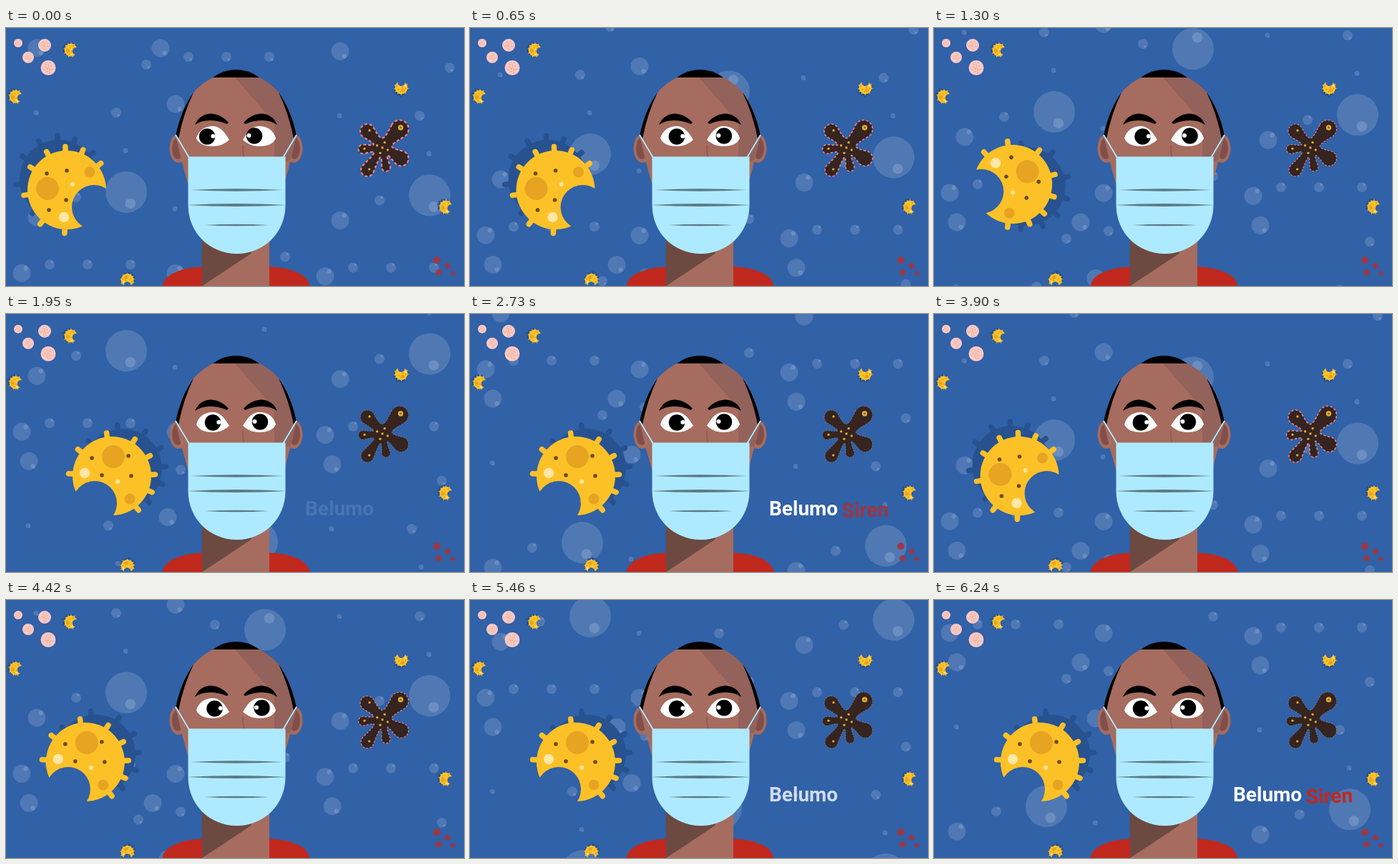
These frames come from a looping animation (640 by 360 pixels, 6.5 s). An HTML page with a canvas:

```html
<!DOCTYPE html>
<html lang="en">
<head>
<meta charset="utf-8">
<style>
  html, body { margin: 0; width: 100%; height: 100%; overflow: hidden; background: #3161a7; }
  canvas { display: block; width: 640px; height: 360px; }
</style>
</head>
<body>
<canvas id="stage" width="640" height="360"></canvas>
<script>
const ctx = document.getElementById('stage').getContext('2d');
const TICK = 130, SLOTS = 50, PASS = 25, TRAVEL = 1950;
const SKIN = '#a56c5f', SKIN_DARK = '#93625a', MASK = '#aeeaff', BLACK = '#000';
const YELLOW = '#fdc128', ORANGE = '#e6a422', CREAM = '#ffe7a5', BROWN = '#6b4c14';
const TAU = 2 * Math.PI, FACE_X = 321.5;
const rad = deg => deg * TAU / 360;
const ramp = (t, from, to) => Math.min(1, Math.max(0, (t - from) / (to - from)));
// Quick at both ends, slow in the middle.
const surge = p => p + 0.12 * Math.sin(TAU * p);

function disc(x, y, r, color, ry = r) {
  ctx.fillStyle = color;
  ctx.beginPath();
  ctx.ellipse(x, y, r, ry, 0, 0, TAU);
  ctx.fill();
}

function shape(d, color) {
  ctx.fillStyle = color;
  ctx.fill(new Path2D(d));
}

function line(d, color, width) {
  ctx.strokeStyle = color;
  ctx.lineWidth = width;
  ctx.stroke(new Path2D(d));
}

// Draws the left half of the face, then its mirror image.
function bothSides(draw) {
  draw();
  ctx.save();
  ctx.translate(2 * FACE_X, 0);
  ctx.scale(-1, 1);
  draw();
  ctx.restore();
}

// One group of bubbles by radius; the whole field repeats it.
const bubbleGroup = [
  [12.5, [43, 28], [43, 264], [22, 342]],
  [7, [196, 51], [154, 118], [98, 236], [61, 330], [114, 330], [174, 330]],
  [3.5, [42, 118], [167, 171]],
  [29, [168, 229]]
];

function bubble(x, y, r, shineX, shineY) {
  disc(x, y, r, 'rgba(255,255,255,.15)');
  disc(x + r * shineX, y + r * shineY, r * 0.25, 'rgba(255,255,255,.16)');
}

function bubbles(scroll) {
  for (let row = 0; row < 2; row++) {
    for (let col = 0; col < 3; col++) {
      const flip = col === 1;
      const dx = 194 * col + 36 * (col >> 1) - 11 * row;
      const dy = 355 * row + 2.2 * col - scroll;
      for (const [r, ...spots] of bubbleGroup) {
        for (const [x, y] of spots) {
          const side = (r > 20 || y < 180) !== flip ? 1 : -1;
          bubble(x + dx, (flip ? 368 - y : y) + dy, r, r > 20 ? 0.2 : 0.45, 0.55 * side);
        }
      }
    }
  }
}

function virusBody(color) {
  ctx.strokeStyle = color;
  ctx.lineWidth = 7.5;
  ctx.lineCap = 'round';
  ctx.beginPath();
  for (const deg of [-177, -142, -97, -58, -28, -2, 22, 52]) {
    const c = Math.cos(rad(deg)), s = Math.sin(rad(deg));
    ctx.moveTo(c * 48, s * 48);
    ctx.lineTo(c * 60.5, s * 60.5);
  }
  ctx.stroke();
  // Disc with a round bite taken out of its edge.
  const bx = -24, by = 38, R = 55, r = 31, d = Math.hypot(bx, by), dir = Math.atan2(by, bx);
  const outer = Math.acos((d * d + R * R - r * r) / (2 * d * R));
  const inner = Math.acos((d * d + r * r - R * R) / (2 * d * r));
  ctx.fillStyle = color;
  ctx.beginPath();
  ctx.arc(0, 0, R, dir + outer, dir - outer + TAU);
  ctx.arc(bx, by, r, dir + Math.PI + inner, dir + Math.PI - inner, true);
  ctx.fill();
}

function virus(x, y, deg, scale = 1) {
  ctx.save();
  ctx.translate(x, y);
  ctx.rotate(rad(deg));
  ctx.scale(scale, scale);
  ctx.translate(-8, 8);
  ctx.save();
  ctx.translate(15, -11);
  virusBody('#27528f');
  ctx.restore();
  virusBody(YELLOW);
  disc(2, -27, 16, ORANGE);
  disc(25, 32, 7.5, ORANGE);
  disc(-38, -4, 7.2, CREAM);
  disc(8, 8, 2.9, CREAM);
  for (const side of [-1, 1]) {
    disc(-2.5 + 25.5 * side, -26.5 - 1.5 * side, 2.8, BROWN);
    disc(6.5 + 20.5 * side, -0.5 + 0.5 * side, 2.8, BROWN);
  }
  ctx.restore();
}

function amoeba(rim) {
  const cx = 526, cy = 167, spread = 1.85, core = 8;
  const arms = [[550, 141, 12.5], [552, 182, 10.5], [531, 194, 6], [505, 198, 9], [499, 169, 6.5], [505, 144, 10]]
    .map(([x, y, r]) => ({ x, y, r, a: Math.atan2(y - cy, x - cx) }));
  const around = (x, y, r, a) => [x + r * Math.cos(a), y + r * Math.sin(a)];
  const path = new Path2D();
  arms.forEach(({ x, y, r, a }, i) => {
    const next = arms[(i + 1) % arms.length];
    const gap = (next.a - a + TAU) % TAU;
    path.arc(x, y, r, a - spread, a + spread);
    path.bezierCurveTo(
      ...around(cx, cy, core, a + gap * 0.4),
      ...around(cx, cy, core, a + gap * 0.6),
      ...around(next.x, next.y, next.r, next.a - spread));
  });
  ctx.fillStyle = '#35241f';
  ctx.fill(path);
  ctx.save();
  ctx.lineCap = 'butt';
  ctx.setLineDash([1 + rim * 1.3, 1.6 + rim * 0.6]);
  ctx.strokeStyle = rim < 0.8 ? '#b89a98' : '#ee8084';
  ctx.lineWidth = rim;
  ctx.stroke(path);
  ctx.restore();

  for (let i = 0; i < 5; i++) disc(...around(cx, cy, i && 8, i * TAU / 4 + 0.4), 1.7, '#dfab32');
  for (const { x, y, r } of arms.slice(3)) disc(x + r * 0.3, y - r * 0.1, 1.7, '#dfab32');
  disc(551.5, 139, 3.7, '#e3b033');
  disc(551.5, 139, 1.2, BROWN);
}

function smallCells() {
  for (const [x, y, r] of [[17, 21, 6], [54, 24, 9], [31, 41, 8], [59, 55.5, 10.5]]) {
    disc(x, y, r, '#f8c8c8');
    for (let i = 0; i < 12; i++) {
      const q = r * 0.2 * Math.sqrt(i), a = i * 2.4;
      disc(x + q * Math.cos(a), y + q * Math.sin(a), r * 0.1, '#efb27c');
    }
  }
  for (const [x, y, r] of [[602, 324, 5], [617, 331.5, 3.8], [604.5, 341, 4.3], [624.5, 342, 3]])
    disc(x, y, r, '#9c3947');
  for (const [x, y, deg] of [[89, 30, -110], [12, 95, -110], [613, 249, -110], [552, 85, 148], [170, 350, -32]])
    virus(x, y, deg, 0.162);
}

function pleat(width, y, h) {
  const left = FACE_X + 1 - width / 2, right = left + width;
  shape(`M${left} ${y} Q${FACE_X} ${y - h} ${right} ${y} Q${FACE_X} ${y + h} ${left} ${y}Z`, '#5d7987');
}

function pupil(x, y, shine) {
  disc(x, y, 11.2, BLACK);
  disc(x + shine, y - 0.5, 3, '#fff');
}

function person(gaze) {
  bothSides(() => shape('M219 360 C219 345 245 333 280 333 H322 V360Z', '#c1291e'));
  shape('M274 280 H368 V360 H274Z', SKIN);
  shape('M274 290 H350 L342 315 L274 360Z', '#6c4941');

  bothSides(() => {
    disc(241, 168, 12.5, SKIN, 20);
    disc(240, 168, 8, '#814f49', 15);
    shape('M237 150 Q245 113 262 90 Q273 77 289 69 H322 V220 H255 Q246 190 237 150Z', SKIN);
  });
  shape('M320 69 H354 Q370 77 381 90 Q398 113 406 150 L397 185 H375 V132Z', SKIN_DARK);
  line('M331 163 Q330 172 333 181', '#7f5149', 1);
  bothSides(() => {
    shape('M289 69 Q304 58 322 58 V69Z', BLACK);
    shape('M262 90 Q245 113 237 150 L241 154 Q248 119 262 90Z', BLACK);
    shape('M264 135 Q271 119.5 287 119.5 Q302 121 311 132 Q309 135 305 132.5 Q295 128.5 284 129 Q273 129 264 135Z', BLACK);
    shape('M266 154 C269 141 281 136 291 137 C302 139 307 148 312 156 C304 163 297 165 288 165 C277 165 269 161 266 154Z', '#fff');
  });
  pupil(gaze, 151.5, 8.3);
  pupil(gaze + 66, 150.5, -7.5);

  bothSides(() => line('M237 149 L256 181', MASK, 1.8));
  shape('M254.5 179.5 H390.5 V247 C390.5 286 360 315 322.5 315 C285 315 254.5 286 254.5 247Z', MASK);
  pleat(129, 226, 3.6);
  pleat(140, 247, 3.8);
  pleat(91, 275, 2.4);
}

function label(text, x, y, color, alpha, deg) {
  ctx.save();
  ctx.globalAlpha = alpha;
  ctx.translate(x, y);
  ctx.rotate(rad(deg));
  ctx.font = '700 28px Roboto, sans-serif';
  ctx.fillStyle = color;
  ctx.fillText(text, 0, 0);
  ctx.restore();
}

function draw(now) {
  let slot = Math.floor(now / TICK) % SLOTS;
  if (slot === 39 || slot === 49) slot--; // held poses
  const t = slot % PASS * TICK;
  const p = ramp(t, 0, TRAVEL);

  ctx.fillStyle = '#3161a7';
  ctx.fillRect(0, 0, 640, 360);
  bubbles(0.0763 * t + 7.6e-6 * t * t);
  smallCells();
  virus(77 + 79 * surge(p), 218, 45 * Math.ceil(18 * surge(p)) - 90);
  amoeba(0.6 + 1.6 * (1 - p));
  person(281 + 8 * p + 6 * Math.sin(Math.PI * p));
  label('Belumo', 418, 281, '#fff', ramp(t, 1900, 2300), 0);
  label('Siren', 520, 284, '#c1291e', ramp(t, 2340, 2860), -1.5);
}

const start = performance.now();
function loop() {
  draw(performance.now() - start);
  requestAnimationFrame(loop);
}
loop();
</script>
</body>
</html>
```
